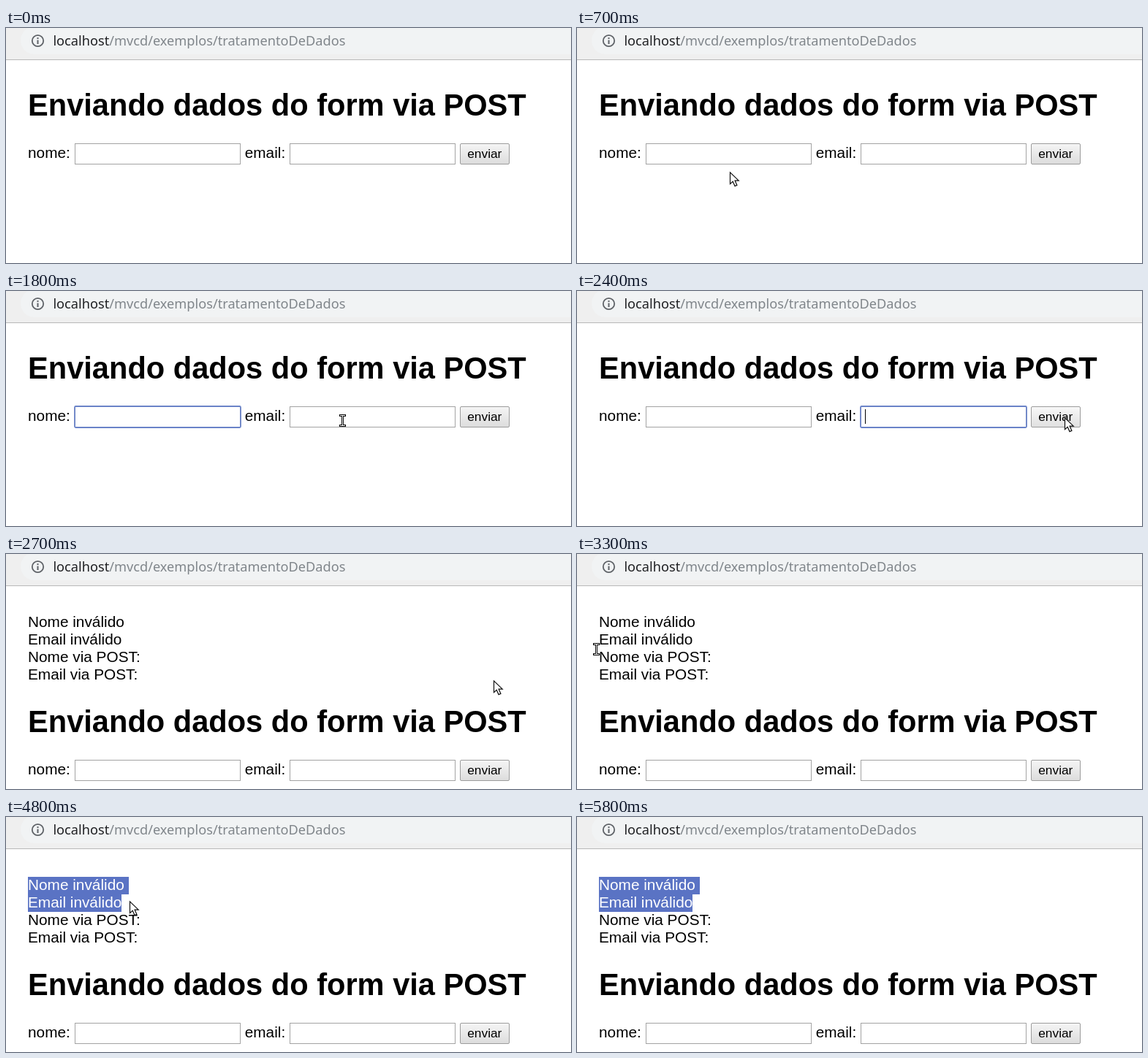
An HTML page for the animation above (6200 ms loop, 773 by 322 pixels).

```html
<!DOCTYPE html>
<html lang="pt">
<head>
<meta charset="utf-8">
<title>Formulário POST</title>
<style>
  html, body { margin: 0; width: 100%; height: 100%; overflow: hidden; background: #fff; }
  svg { display: block; width: 773px; height: 322px; }
  text { white-space: pre; }
  .page { font: 20.8px "Liberation Sans", Arial, sans-serif; }
  .title { font-size: 41.6px; font-weight: bold; }
  .small { font-size: 17.33px; }
  .url { font: 18.2px "Noto Sans", "Open Sans", sans-serif; }
  .field { fill: #fff; stroke: #a3a3a3; }
  .ring { fill: none; stroke: #6a83c8; stroke-width: 1.8; }
</style>
</head>
<body>
<svg viewBox="0 0 773 322" xmlns="http://www.w3.org/2000/svg">
  <defs>
    <linearGradient id="face" x1="0" y1="0" x2="0" y2="1">
      <stop offset="0" stop-color="#f5f5f5"/>
      <stop offset="1" stop-color="#dcdcdc"/>
    </linearGradient>
    <linearGradient id="faceHover" x1="0" y1="0" x2="0" y2="1">
      <stop offset="0" stop-color="#f8f8f8"/>
      <stop offset="1" stop-color="#e0e0e0"/>
    </linearGradient>
    <clipPath id="picked">
      <rect id="pick1" x="30" y="82" height="24"/>
      <rect id="pick2" x="30" y="106" height="24"/>
    </clipPath>
  </defs>

  <rect width="773" height="322" fill="#fff"/>
  <rect width="773" height="43" fill="#efefef"/>
  <rect x="20" y="-2" width="800" height="38" rx="19" fill="#f1f3f4"/>
  <rect y="43" width="773" height="1" fill="#b8b8b8"/>
  <g fill="#5f6368">
    <circle cx="43.5" cy="17.5" r="7.7" fill="none" stroke="#5f6368" stroke-width="1.8"/>
    <rect x="42.5" y="13" width="2" height="2"/>
    <rect x="42.5" y="16.5" width="2" height="5.5"/>
  </g>
  <text class="url" x="64.4" y="24" fill="#80868b"><tspan fill="#202124">localhost</tspan>/mvcd/exemplos/tratamentoDeDados</text>

  <g id="result" class="page">
    <text x="30" y="100">Nome inválido</text>
    <text x="30" y="124">Email inválido</text>
    <text x="30" y="148">Nome via POST:</text>
    <text x="30" y="172">Email via POST:</text>
    <g clip-path="url(#picked)">
      <rect x="30" y="82" width="140" height="48" fill="#5a73c4"/>
      <text x="30" y="100" fill="#fff">Nome inválido</text>
      <text x="30" y="124" fill="#fff">Email inválido</text>
    </g>
  </g>

  <g id="form" class="page">
    <text class="title" x="30" y="120">Enviando dados do form via POST</text>
    <text x="30" y="178">nome:</text>
    <rect class="field" x="94.5" y="158.5" width="226" height="28"/>
    <text x="326.7" y="178">email:</text>
    <rect class="field" x="388.5" y="158.5" width="226" height="28"/>
    <rect id="button" x="621.5" y="158.5" width="67" height="28" rx="1.5" stroke="#9c9c9c"/>
    <text class="small" x="631.2" y="178">enviar</text>
    <g id="focus">
      <rect class="ring" x="94" y="158" width="227" height="29" rx="1.5"/>
      <rect id="caret" x="100" y="162" width="1" height="20"/>
    </g>
  </g>

  <path id="arrow" d="M.5 .8V16.6L4.2 13.2 7 19.6 9.9 18.4 7.1 12.1H12.2Z" fill="#fff" stroke="#111" stroke-width="1.2"/>
  <g id="beam" fill="none">
    <path d="M-4 -6.5H5M.5 -6.5V7.5M-4 7.5H5" stroke="#000" stroke-width="3"/>
    <path d="M-3 -6.5H4M.5 -6.5V7.5M-3 7.5H4" stroke="#fff"/>
  </g>
</svg>
<script>
const LOOP = 6200, TICK = 100;
const ENTER = 200, FOCUS_NAME = 900, FOCUS_MAIL = 2000, SUBMIT = 2700;
const DRAG = 4400, DROP = 4800, LEAVE = 5800;
const $ = id => document.getElementById(id);

// Pointer moves; it rests between them.
const moves = [
  { from: 100, to: 800, x: 197, y: 176 },
  { from: 900, to: 1200, x: 302, y: 191 },
  { from: 1200, to: 1500, x: 430, y: 178 },
  { from: 1500, to: 2000, x: 480, y: 177 },
  { from: 2000, to: 2400, x: 667, y: 173, ease: u => 1 - (1 - u) ** 3 },
  { from: 3000, to: 3300, x: 26, y: 130 },
  { from: 3300, to: 3400, x: 4, y: 126 },
  { from: 3400, to: 3700, x: 47, y: 113 },
  { from: 3700, to: 4200, x: 36, y: 93 },
  { from: 4300, to: DROP, x: 169, y: 115 },
  { from: 5000, to: 5100, x: 168, y: 127 },
  { from: 5100, to: LEAVE, x: 88, y: -27 }
];

function pointer(t) {
  let x = 278, y = 322;
  for (const m of moves) {
    if (t <= m.from) break;
    const u = Math.min(1, (t - m.from) / (m.to - m.from));
    const k = m.ease ? m.ease(u) : u;
    x += (m.x - x) * k;
    y += (m.y - y) * k;
  }
  return { x: Math.round(x), y: Math.round(y) };
}

const within = (v, min, max) => v >= min && v <= max;

function overText({ x, y }, sent) {
  if (sent) return y < 36 || (x < 165 && within(y, 82, 178));
  return within(y, 158, 187) && (within(x, 94, 321) || within(x, 388, 615));
}

const show = (id, on) => $(id).setAttribute("display", on ? "inline" : "none");
const move = (id, x, y) => $(id).setAttribute("transform", `translate(${x} ${y})`);

function select(t) {
  const p = pointer(Math.min(t, DROP));
  const reach = t < DRAG ? 0 : p.x - 30, below = p.y >= 106;
  $("pick1").setAttribute("width", reach && below ? 138 : Math.min(reach, 132));
  $("pick2").setAttribute("width", below ? Math.min(reach, 128) : 0);
}

function draw(time) {
  const t = Math.floor((time % LOOP) / TICK) * TICK;
  const sent = t >= SUBMIT, mail = t >= FOCUS_MAIL;
  const p = pointer(t), inside = within(t, ENTER, LEAVE - 1);
  const beam = overText(p, sent);

  show("result", sent);
  move("form", 0, sent ? 124 : 0);
  show("focus", t >= FOCUS_NAME && !sent);
  move("focus", mail ? 294 : 0, 0);
  show("caret", mail || (t - FOCUS_NAME) % 1000 < 500);
  const hover = !sent && p.x > 621;
  $("button").setAttribute("fill", hover ? "url(#faceHover)" : "url(#face)");
  select(t);

  show("arrow", inside && !beam);
  show("beam", inside && beam);
  move(beam ? "beam" : "arrow", p.x, p.y);
}

const start = performance.now();
function frame() {
  draw(performance.now() - start);
  requestAnimationFrame(frame);
}
frame();
</script>
</body>
</html>
```
